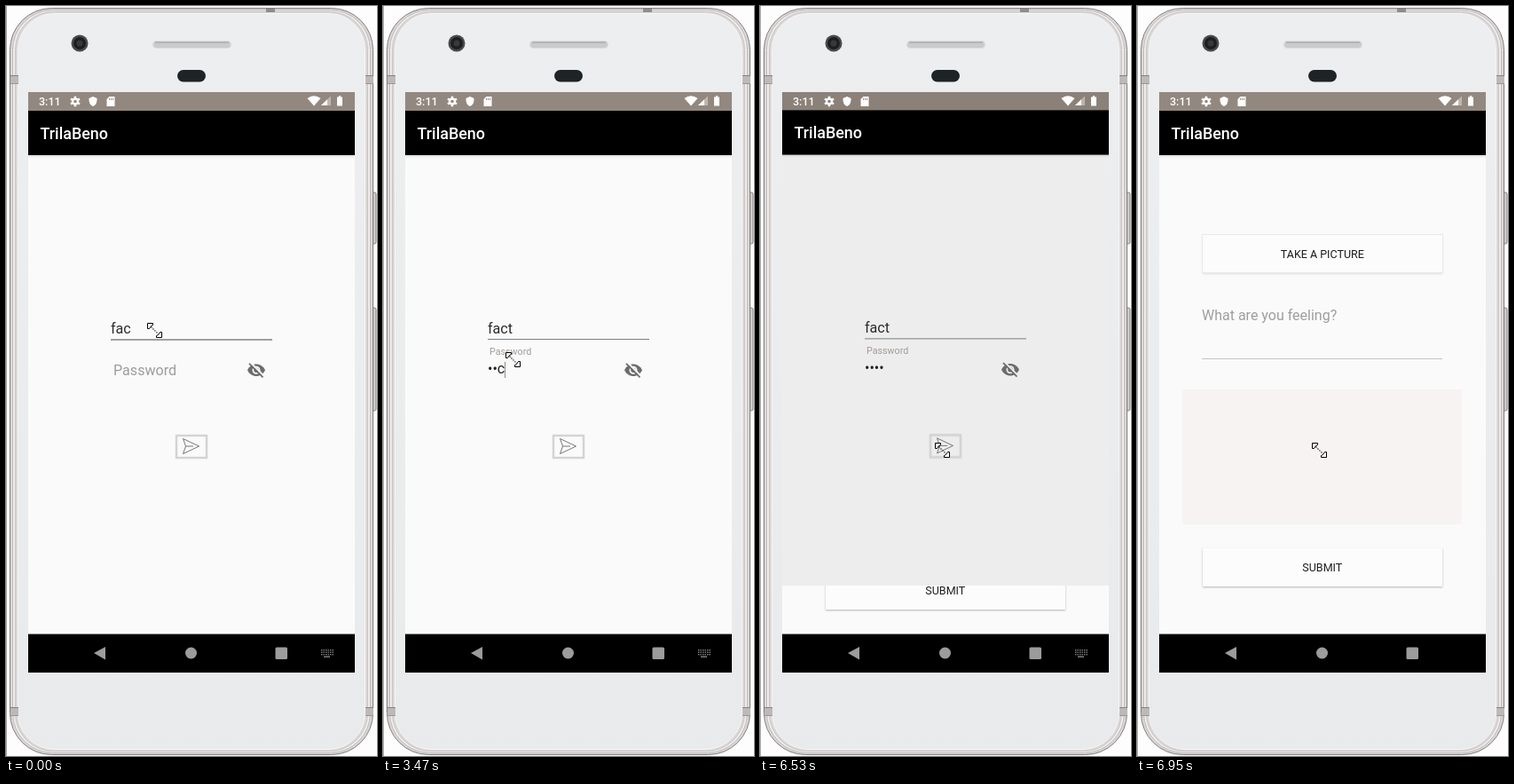
Animation of 418x845 px, one loop 8000 ms. Source, as an HTML page with a canvas:

```html
<!DOCTYPE html>
<html lang="en">
<head>
<meta charset="utf-8">
<title>Login demo</title>
<style>
html, body { margin: 0; width: 100%; height: 100%; overflow: hidden; background: #fdfdfd; }
canvas { display: block; width: 418px; height: 845px; }
</style>
</head>
<body>
<canvas id="stage" width="418" height="845"></canvas>
<script>
const ctx = document.getElementById('stage').getContext('2d');
const LOOP = 8000;
const APP = 'TrilaBeno';
const WORD = 'fact';
const PAPER = '#fafafa';

// Times in ms
const FOCUS = 1940;
const KEYS = [3040, 3190, 3470, 3720];
const PRESS = 4960;
const OPEN = 6510;
const STEP = 140;
const BLINK = 520;
const PEEK = 1500;

const clamp = v => Math.max(0, Math.min(1, v));
const easeOut = v => 1 - (1 - clamp(v)) ** 2;
const blink = age => age >= 0 && Math.floor(age / BLINK) % 2 === 0;

function rect(x, y, w, h, color) {
  ctx.fillStyle = color;
  ctx.fillRect(x, y, w, h);
}

function paint(fill, stroke, width = 1) {
  if (fill) { ctx.fillStyle = fill; ctx.fill(); }
  if (stroke) { ctx.strokeStyle = stroke; ctx.lineWidth = width; ctx.stroke(); }
}

function round(x, y, w, h, r, fill, stroke) {
  ctx.beginPath();
  ctx.roundRect(x, y, w, h, r);
  paint(fill, stroke);
}

function disc(x, y, r, fill, stroke, width) {
  ctx.beginPath();
  ctx.arc(x, y, r, 0, Math.PI * 2);
  paint(fill, stroke, width);
}

function poly(points, fill, stroke) {
  ctx.beginPath();
  points.forEach(([x, y]) => ctx.lineTo(x, y));
  ctx.closePath();
  paint(fill, stroke);
}

function line(x1, y1, x2, y2, color, width) {
  ctx.beginPath();
  ctx.moveTo(x1, y1);
  ctx.lineTo(x2, y2);
  paint(null, color, width);
}

function text(str, x, y, size, color, weight = 400, align = 'left') {
  ctx.font = `${weight} ${size}px Roboto, sans-serif`;
  ctx.textAlign = align;
  ctx.fillStyle = color;
  ctx.fillText(str, x, y);
  return ctx.measureText(str).width;
}

function moved(x, y, draw) {
  ctx.save();
  ctx.translate(x, y);
  draw();
  ctx.restore();
}

function shadow(alpha, blur, y) {
  ctx.shadowColor = `rgba(0,0,0,${alpha})`;
  ctx.shadowBlur = blur;
  ctx.shadowOffsetY = y;
}

function phone() {
  rect(0, 0, 418, 845, '#fdfdfd');
  rect(0, 0, 1, 845, '#a6a6a6');
  round(412, 210, 5, 58, 2, '#cfcaca', '#888383');
  round(412, 340, 5, 116, 2, '#cfcaca', '#888383');

  // Metal rim, from the outside in
  ['#827d7d', '#c0b9b9', '#cac4c4'].forEach((edge, i) => {
    const x = 4.5 + 3 * i, y = 2.5 + 2 * i;
    round(x, y, 418 - 2 * x, 846 - 2 * y, 47 - 2 * i, i % 2 ? '#efecec' : '#dcd8d8', edge);
  });
  const face = ctx.createLinearGradient(0, 8, 0, 840);
  face.addColorStop(0, '#eceeef');
  face.addColorStop(1, '#e8eaeb');
  round(13.5, 8.5, 391, 829, 41, face, '#f6f6f6');
  for (const x of [5, 405]) {
    for (const y of [78, 790]) {
      rect(x, y, 9, 10, '#bdb9b9');
      rect(x, y, 9, 1, '#858181');
      rect(x, y + 9, 9, 1, '#9b9797');
    }
  }
  rect(293, 3, 10, 4, '#918c8c');

  disc(83, 42, 9.5, '#4a4a4c');
  disc(83, 42, 7, '#1d1f21');
  disc(83, 42, 3.5, '#343c38');
  round(165.5, 39.5, 88, 8, 4, '#c9cbcd', '#dcddde');
  rect(168, 40, 83, 2, '#b3b5b8');
  round(193, 72, 32, 13.5, 7, '#1e2325');
}

function statusIcons() {
  const w = '#fff';
  text('3:11', 37, 112, 12.5, w, 500);

  disc(78, 107.5, 3, null, w, 2.4);
  for (let a = Math.PI / 6; a < 6.5; a += Math.PI / 3) {
    const c = Math.cos(a), s = Math.sin(a);
    line(78 + 3.6 * c, 107.5 + 3.6 * s, 78 + 5.8 * c, 107.5 + 5.8 * s, w, 2.4);
  }

  ctx.beginPath();
  ctx.moveTo(98, 102);
  ctx.lineTo(102.5, 104);
  ctx.quadraticCurveTo(103, 111, 98, 113);
  ctx.quadraticCurveTo(93, 111, 93.5, 104);
  paint(w);

  poly([[116.5, 102], [122.5, 102], [122.5, 113], [113.5, 113], [113.5, 105]], w);
  for (let x = 116; x < 122; x += 2) rect(x, 104, 1, 2, '#93887f');

  ctx.beginPath();
  ctx.moveTo(347, 112.5);
  ctx.lineTo(339.5, 104);
  ctx.quadraticCurveTo(347, 98.5, 354.5, 104);
  paint(w);
  poly([[355, 112], [366, 112], [366, 101.5]], 'rgba(255,255,255,.4)');
  poly([[355, 112], [362, 112], [362, 105.3]], w);
  rect(373, 102.5, 6, 10, w);
  rect(375, 101, 2, 2, w);
}

function navBar(top, keyboard) {
  const c = '#9c9c9c';
  rect(25, top, 368, 751 - top, '#000');
  poly([[99, 729], [112, 722], [112, 736.5]], c);
  disc(208.5, 729, 6.5, c);
  round(303.5, 722.5, 13.5, 13.5, 1.5, c);
  if (!keyboard) return;
  for (let i = 0; i < 18; i++) {
    rect(355 + (i % 6) * 2.5, 725 + Math.floor(i / 6) * 2.5, 1.4, 1.4, '#858585');
  }
  rect(358, 732.5, 7, 1.4, '#858585');
}

function appBar() {
  for (let i = 0; i < 3; i++) rect(25, 168 + i, 368, 1, `rgba(0,0,0,${.12 / 2 ** i})`);
  rect(25, 118, 368, 50, '#000');
}

function title(color = '#fff') {
  text(APP, 38.5, 150, 17.9, color, 500);
}

function nameField(t) {
  const focused = t < FOCUS + STEP;
  const w = text(t < 280 ? WORD.slice(0, 3) : WORD, 118, 369, 16.1, '#2a2a2a');
  if (t < FOCUS && blink(t + 2 * BLINK - 160)) rect(Math.floor(118 + w), 356, 1, 17, '#9b8878');
  rect(118, 375, 182, focused ? 2 : 1, focused ? '#a0a0a0' : '#7d7d7d');
}

function eye(bg) {
  const c = '#6c6c6c';
  ctx.beginPath();
  ctx.moveTo(-10, 0);
  ctx.bezierCurveTo(-6, -9, 6, -9, 10, 0);
  ctx.bezierCurveTo(6, 9, -6, 9, -10, 0);
  paint(c);
  disc(0, 0, 4.5, bg);
  disc(0, 0, 2.7, c);
  line(-6.5, -8.5, 9, 7, bg, 2);
  line(-8, -7.5, 7.5, 8, c, 1.7);
}

function passwordField(t, bg) {
  const k = easeOut((t - FOCUS + 10) / 220);
  text('Password', 121 - k, 415.7 - 23 * k, 16.1 - 5.4 * k, k < .5 ? '#9c9c9c' : '#a39b95');

  // The newest letter stays readable for a moment
  const typed = KEYS.filter(key => key <= t);
  const n = typed.length;
  const last = n ? typed[n - 1] : FOCUS;
  const clear = n && t - last < PEEK ? 1 : 0;
  const w = text('•'.repeat(n - clear) + WORD.slice(n - clear, n), 118, 414, 16.1, '#222');
  if (blink(t - last)) rect(Math.floor(118 + w), 401, 1, 18, '#978b81');
  moved(282, 410.3, () => eye(bg));
}

function sendButton(t) {
  const pressed = t >= PRESS && t < PRESS + 300;
  const p = clamp((t - PRESS) / STEP);
  ctx.save();
  if (pressed) {
    disc(205, 500, 20 + 17.5 * p, '#f2f2f2', '#ececec', 2);
    shadow(.3, 4, 0);
    rect(191, 484 + 3 * p, 35, 24, '#d6d6d6');
    shadow(0, 0, 0);
    rect(197, 490, 23, 16, '#f8f8f8');
  } else {
    shadow(.12, 2, 0);
    ctx.strokeStyle = '#d3d3d3';
    ctx.lineWidth = 2;
    ctx.strokeRect(192, 484, 34, 25);
  }
  ctx.restore();
  poly([[199.5, 487.5], [217.5, 496], [199.5, 504.5], [202.5, 496]], null, '#777');
  line(202.5, 496, 211, 496, '#777', 1);
}

function login(t, bg) {
  rect(25, 168, 368, 541, bg);
  appBar();
  title();
  nameField(t);
  passwordField(t, bg);
  sendButton(t);
}

function button(label, y, flat) {
  ctx.save();
  shadow(flat ? .1 : .28, 2, 1);
  rect(74, y, 270, 43, '#fcfcfc');
  ctx.restore();
  if (flat) round(73.5, y - .5, 271, 43, 0, null, '#e8e8e8');
  text(label, 208.8, y + 26, 12.5, '#1c1c1c', 400, 'center');
}

function post(settled) {
  rect(25, 168, 368, 541, PAPER);
  button('TAKE A PICTURE', 258, true);
  text('What are you feeling?', 73, 354, 16, '#9e9e9e');
  rect(73, 397, 271, 1, settled ? '#c4c4c4' : '#8f8f8f');
  rect(51, 432, 315, 152, '#f7f3f2');
  button('SUBMIT', 611, false);
  appBar();
}

function opening(t) {
  const step = Math.floor((t - OPEN) / STEP);
  const shift = step > 2 ? 0 : 26 * Math.exp(-1.26 * step);
  const lift = -.6 - 8.8 * step;
  rect(25, 97, 368, 26, ['#8b8179', '#81776f'][step] || '#93887f');
  moved(0, shift, () => post(step > 2));
  if (step === 0) {
    ctx.save();
    ctx.beginPath();
    ctx.rect(25, 117, 368, 536);
    ctx.clip();
    moved(0, lift, () => login(t, '#ededed'));
    ctx.restore();
  } else {
    if (step === 1) {
      moved(0, lift, () => {
        rect(25, 118, 368, 50, '#000');
        title('#dcdcdc');
      });
    }
    moved(0, shift, () => title());
  }
  navBar(707.6 + (step ? shift : 0), !step);
}

function arrowHead() {
  poly([[0, 0], [6, 0], [6, 2], [4, 3], [2, 6], [0, 6]], '#fff', '#000');
}

function pointer(t) {
  const stops = [[0, 159, 357], [990, 146, 374], [1110, 134, 398], [1230, 167, 414], [2090, 138, 390], [PRESS + 150, 197, 492]];
  const [, x, y] = stops.filter(s => s[0] <= t).pop();
  moved(x + .5, y + .5, () => {
    ctx.setLineDash([1.4, 1.4]);
    line(4, 4, 12, 12, '#222', 1.2);
    ctx.setLineDash([]);
    arrowHead();
    ctx.translate(16, 16);
    ctx.rotate(Math.PI);
    arrowHead();
  });
}

function screen(t) {
  rect(25, 97, 368, 654, PAPER);
  if (t < OPEN) {
    rect(25, 97, 368, 21, '#93887f');
    login(t, PAPER);
    navBar(707.6, true);
  } else {
    opening(t);
  }
  statusIcons();
}

const start = performance.now();

function frame(now) {
  const t = Math.max(0, now - start) % LOOP;
  phone();
  screen(t);
  pointer(t);
  requestAnimationFrame(frame);
}

requestAnimationFrame(frame);
</script>
</body>
</html>
```
